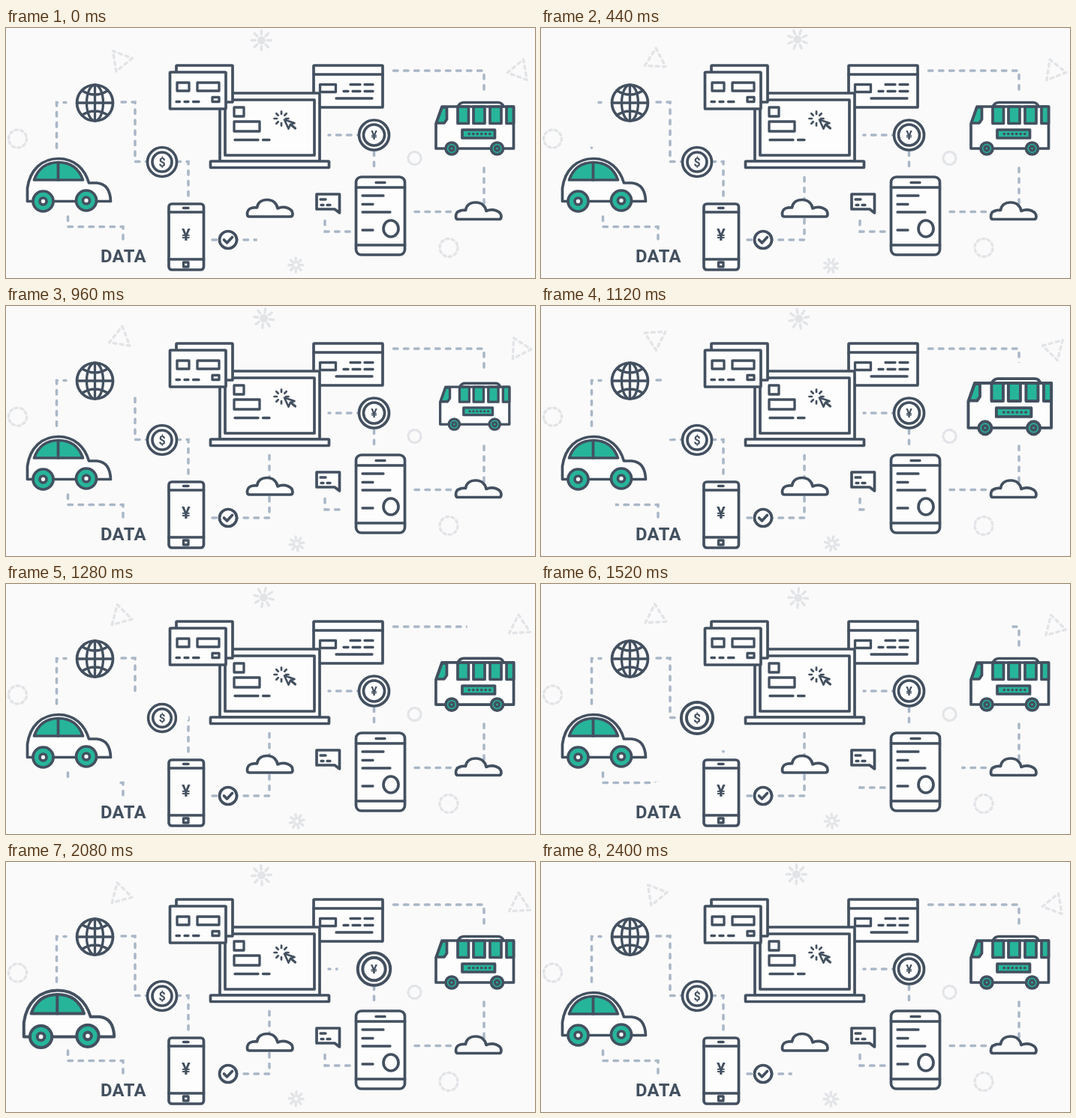
Write an HTML page that moves like this. It is 705 px wide and 334 px high and loops after 2440 ms.

```html
<!DOCTYPE html>
<html lang="en">
<head>
<meta charset="utf-8">
<title>Connected services</title>
<style>
  html, body { margin: 0; width: 100%; height: 100%; overflow: hidden; background: #fafafa; }
  svg { display: block; width: 100%; height: 100%; }
  text { font-family: Roboto, Arial, sans-serif; font-weight: 700; fill: #435060; text-anchor: middle; }
  .ink { fill: none; stroke: #435060; stroke-width: 3.7; stroke-linecap: round; stroke-linejoin: round; }
  .white { fill: #fdfdfd; }
  .teal { fill: #27b59a; }
  .thin { stroke-width: 3.3; }
  .fine { stroke-width: 2.7; }
  .dash path { fill: none; stroke: #a9b7c7; stroke-width: 3.5; stroke-linecap: round; stroke-dasharray: 5.5 8.5; }
  .cover path { fill: none; stroke: #fafafa; stroke-width: 13; stroke-linecap: round; stroke-linejoin: round; }
  .decor { fill: none; stroke: #e2e4e7; stroke-width: 3.4; stroke-linecap: round; stroke-linejoin: round; }
</style>
</head>
<body>
<svg viewBox="0 0 705 334" preserveAspectRatio="none">
  <g class="decor" id="decor"></g>
  <g class="dash" id="lines">
    <path d="M637 187V238"/>
    <path d="M490.500 165V187"/>
  </g>

  <g class="ink">
    <rect class="white" x="410" y="50" width="92" height="56" rx="1"/>
    <path d="M410 62H502"/>
    <rect class="thin" x="418.500" y="75.500" width="21" height="10"/>
    <path class="thin" d="M459 75.500H472M478 75.500H489M450 84.500H456M462 84.500H472M478 84.500H489M440 94H488"/>
  </g>

  <g class="cover" id="covers"></g>

  <!-- laptop -->
  <g class="ink">
    <rect class="white" x="285" y="87" width="133" height="91" rx="2"/>
    <rect class="white" x="292" y="96" width="119" height="74"/>
    <rect class="white" x="272.500" y="178" width="158" height="8.500" rx="1"/>
    <rect class="thin" x="304" y="106" width="13" height="12"/>
    <rect class="thin" x="304" y="125" width="34" height="13"/>
    <path class="thin" d="M305 149.500H336M342.500 149.500H351"/>
    <g class="fine" id="burst"></g>
    <path class="fine" d="M371 122.500L384.500 127L379 129L376.500 134.500Z"/>
    <path class="thin" d="M379.500 129L385.500 134"/>
  </g>

  <!-- card pair -->
  <g class="ink">
    <rect class="white" x="227" y="50" width="75" height="49" rx="1"/>
    <rect class="white" x="218.500" y="59" width="74.500" height="49" rx="1"/>
    <rect class="thin" x="228" y="73" width="16" height="11"/>
    <rect class="thin" x="255" y="73" width="29" height="11"/>
    <rect class="thin" x="275" y="92.500" width="9" height="6"/>
    <path class="thin" d="M227 98.500H231.500M238 98.500H243M249.500 98.500H257"/>
  </g>

  <!-- globe -->
  <g class="ink">
    <circle class="white" cx="118.500" cy="100" r="24"/>
    <g class="thin">
      <ellipse cx="118.500" cy="100" rx="11" ry="24"/>
      <path d="M118.500 76V124M94.500 100H142.500M101 83.500Q118.500 94.500 136 83.500M101 116.500Q118.500 105.500 136 116.500"/>
    </g>
  </g>

  <!-- left phone -->
  <g class="ink">
    <rect class="white" x="217" y="235" width="46.500" height="88" rx="4"/>
    <path d="M217 246H263.500M217 309H263.500"/>
    <path class="thin" d="M236.500 240.500H243"/>
    <rect class="thin" x="236.500" y="313" width="6.500" height="6"/>
  </g>
  <text x="240" y="283.500" font-size="22">¥</text>

  <!-- right phone -->
  <g class="ink">
    <rect class="white" x="466.500" y="199" width="65" height="104" rx="7"/>
    <path d="M466.500 213H531.500M466.500 290H531.500"/>
    <path class="thin" d="M493 206.500H505M475 224H503M475 235.500H489M475 246H512M475 270H489"/>
    <ellipse cx="513" cy="268" rx="10" ry="11"/>
  </g>

  <!-- chat bubble -->
  <g class="ink">
    <path class="white" d="M414 222H444.500V247L438 242H414Z"/>
    <path class="thin" d="M419 229H426M420 236.500H423M428 236.500H432"/>
  </g>

  <!-- check mark -->
  <g class="ink">
    <circle class="white" cx="296" cy="283" r="11.500"/>
    <path d="M290.500 283L294.500 287L301.500 279.500"/>
  </g>

  <path class="ink white" id="cloudL"/>
  <path class="ink" id="cloudR"/>

  <g class="ink" id="bus">
    <path class="white" d="M573 128L581 105H602Q605 99.500 610 99.500H656Q661 99.500 663 105H676.500V161H573Z"/>
    <path class="teal" d="M573.500 127L581 106H587.500V122L584 127Z"/>
    <g id="panes"></g>
    <path d="M602 105H663"/>
    <rect class="teal" x="608" y="136" width="43.500" height="11"/>
    <path class="thin" d="M617 141.500H645" stroke-dasharray="0.500 5"/>
    <circle class="teal" cx="594" cy="161" r="8"/><circle class="thin" cx="594" cy="161" r="3"/>
    <circle class="teal" cx="654.500" cy="161" r="8"/><circle class="thin" cx="654.500" cy="161" r="3"/>
  </g>

  <g class="ink" id="car">
    <path class="white" d="M28.500 231.500V214C32 189 48 174.500 70 174.500C91 174.500 105 188 110.500 207H121C133 208 139 217 139.500 231.500Z"/>
    <path class="teal" d="M37.500 203C43 187 54 179.500 70 179.500C86 179.500 97 187 102.500 203Z"/>
    <path d="M69.500 179.500V203"/>
    <circle class="teal" cx="49.500" cy="231.500" r="13.500"/><circle class="white" cx="49.500" cy="231.500" r="4.500"/>
    <circle class="teal" cx="107" cy="230.500" r="13.500"/><circle class="white" cx="107" cy="230.500" r="4.500"/>
  </g>

  <g id="dollar">
    <circle class="ink white" cx="208" cy="179" r="19.500"/>
    <circle class="ink" cx="208" cy="179" r="13"/>
    <text x="208" y="184.800" font-size="16">$</text>
  </g>
  <g id="yen">
    <circle class="ink white" cx="490.500" cy="143" r="20"/>
    <circle class="ink" cx="490.500" cy="143" r="14"/>
    <text x="490.500" y="148.500" font-size="16">¥</text>
  </g>
  <text id="data" x="156.500" y="313" font-size="23.800" letter-spacing="0.5">DATA</text>
</svg>
<script>
const LOOP = 2440, CYCLE = 2400;
const $ = id => document.getElementById(id);

function add(parent, tag, attrs) {
  const el = document.createElementNS('http://www.w3.org/2000/svg', tag);
  for (const k in attrs) el.setAttribute(k, attrs[k]);
  parent.appendChild(el);
  return el;
}

// Dashed links: path, start of the wipe, delay before it is redrawn, sweep time
const links = [
  ['M67.500 160V99.500H80', 100],
  ['M154 99H172V178.500H188', 785, 220],
  ['M227 178.500H243V224', 1155],
  ['M275 283H351V196', 1950],
  ['M82.500 252V265.500H156V283', 970, 180],
  ['M458 272H425V250', 930, 270],
  ['M637 82V57H509', 1115],
  ['M545 245.500H605', 1415, 260, 420],
  ['M474 143H430', 1895, 155, 340],
].map(([d, start, lag = 240, sweep = 480]) => {
  add($('lines'), 'path', { d });
  const el = add($('covers'), 'path', { d });
  return { el, start, sweep, lag, len: el.getTotalLength() };
});

const cloud = (x, y) => `M${x + 3} ${y + 22.5}q-3 0 -3 -3.500c0 -7 6 -9.500 13 -8.500c1 -6.500 6 -10.500 13.500 -10.500`
  + 'c8 0 13 5 14 11.500c9 -4 20 0 20 7.500q0 3.500 -3 3.500Z';
$('cloudL').setAttribute('d', cloud(321.5, 229.5));
$('cloudR').setAttribute('d', cloud(599.5, 233));

for (const [x, w] of [[602, 14.5], [623, 15], [645, 15], [667, 9.5]])
  add($('panes'), 'rect', { class: 'teal', x, y: 105, width: w, height: 22.5 });

function rays(parent, count, inner, outer, place = '') {
  for (let i = 1; i <= count; i++)
    add(parent, 'path', { d: `M${inner} 0H${outer}`, transform: `${place} rotate(${45 + i * 45})` });
}
rays($('burst'), 7, 6, 9.5, 'translate(367 121)');

// Background shapes: place, turns per cycle, starting angle
const spinners = [];
function spinner(x, y, turns, angle, orbit = 0) {
  const el = add($('decor'), 'g', {});
  spinners.push({ el, x, y, turns, angle, orbit });
  return el;
}
function triangle(x, y, turns, angle) {
  const pts = [0, 120, 240].map(a => {
    const r = a * Math.PI / 180;
    return [16 * Math.cos(r), 16 * Math.sin(r)].map(v => v.toFixed(1)).join();
  });
  add(spinner(x, y, turns, angle), 'polygon', { points: pts.join(' '), 'stroke-dasharray': '4 5.2' });
}
function ring(x, y, r, turns) {
  const step = 2 * Math.PI * r / 10;
  add(spinner(x, y, turns, 0), 'circle', { r, 'stroke-dasharray': `${step * .45} ${step * .55}` });
}
function sun(x, y, core, inner, outer, turns, orbit) {
  const g = spinner(x, y, turns, 0, orbit);
  if (core) add(g, 'circle', { r: core, fill: '#e2e4e7', stroke: 'none' });
  rays(g, 8, inner, outer);
}
triangle(152.5, 43, -3, -9);
triangle(684, 57, 3, 50);
ring(15.5, 148, 12, 1);
ring(590, 293.5, 12, -1);
ring(544.5, 174, 8.5, 1);
sun(342, 17, 5.5, 8, 13, 1, 1.7);
sun(387, 317, 0, 4, 9.5, -1, .8);

const ease = u => (1 - Math.cos(Math.PI * Math.min(1, Math.max(0, u)))) / 2;
const wrap = t => (t + CYCLE) % CYCLE;

// Dip, overshoot, settle
function pulse(u) {
  if (u >= 1) return 1;
  if (u < .25) return 1 - .11 * ease(u / .25);
  if (u < .75) return .89 + .21 * ease((u - .25) / .5);
  return 1.1 - .1 * ease((u - .75) / .25);
}
const pops = [
  ['car', 84, 209, 1715],
  ['bus', 624.5, 134, 840],
  ['dollar', 208, 179, 1225],
  ['yen', 490.5, 143, 1780],
].map(([id, x, y, start]) => ({ el: $(id), x, y, start }));

function draw(time) {
  const t = time % LOOP % CYCLE;
  for (const { el, start, sweep, lag, len } of links) {
    const p = wrap(t - start);
    const on = p < sweep + lag;
    el.style.display = on ? '' : 'none';
    if (!on) continue;
    const head = len * ease(p / sweep), tail = len * ease((p - lag) / sweep);
    el.setAttribute('stroke-dasharray', `${Math.max(.1, head - tail)} ${len * 3}`);
    el.setAttribute('stroke-dashoffset', -tail);
  }
  for (const { el, x, y, start } of pops) {
    const s = pulse(wrap(t - start) / 450);
    el.setAttribute('transform', `translate(${x} ${y}) scale(${s}) translate(${-x} ${-y})`);
  }
  for (const { el, x, y, turns, angle, orbit } of spinners) {
    const a = 360 * turns * t / CYCLE, r = (a - 160) * Math.PI / 180;
    el.setAttribute('transform',
      `translate(${x + orbit * Math.cos(r)} ${y + orbit * Math.sin(r)}) rotate(${a + angle})`);
  }
  const w = wrap(t - 1700) / 360;
  const tilt = w < 1 ? -3.5 * Math.sin(2 * Math.PI * w) : 0;
  $('data').setAttribute('transform', `rotate(${tilt} 156.500 305)`);
}

const t0 = performance.now();
function tick() {
  draw(performance.now() - t0);
  requestAnimationFrame(tick);
}
tick();
</script>
</body>
</html>
```
